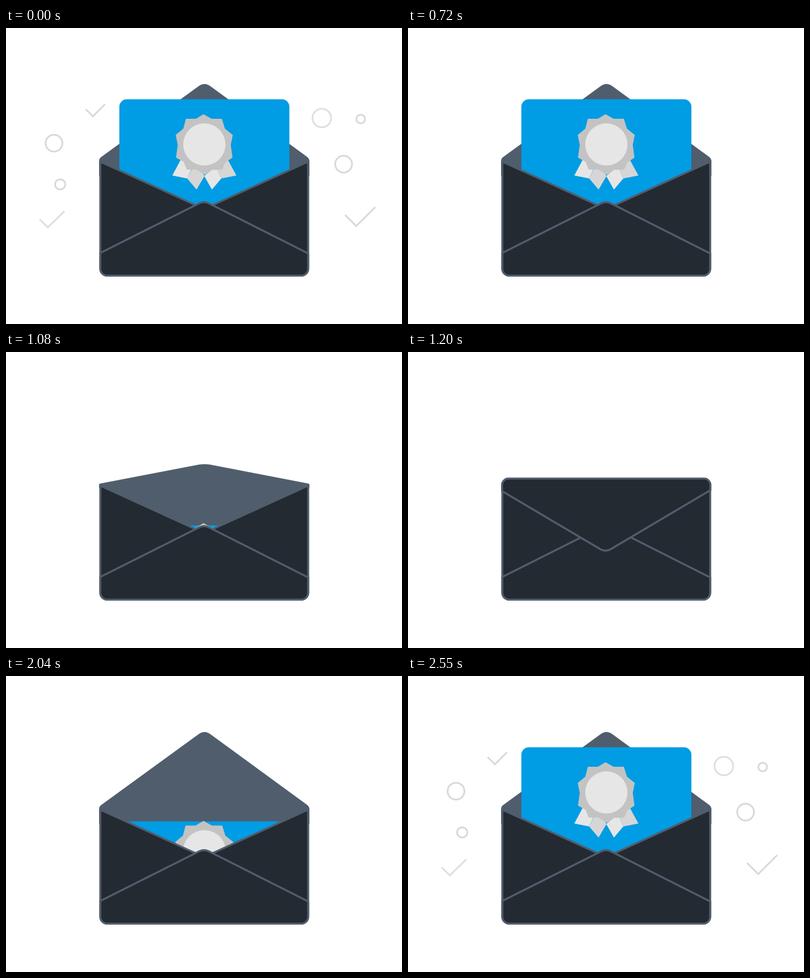
An HTML page without scripts that plays this animation: 800x600 px, repeating every 4500 ms.

```html
<!DOCTYPE html>
<html lang="en">
<head>
<meta charset="utf-8">
<title>Award letter</title>
<style>
  :root {
    --slate: #505d6c;
    --dark: #242a32;
    --in: cubic-bezier(.11, 0, .5, 0);
    --out: cubic-bezier(.5, 1, .89, 1);
    --slow-in: cubic-bezier(.32, 0, .67, 0);
    --slow-out: cubic-bezier(.33, 1, .68, 1);
  }
  html, body { margin: 0; width: 100%; height: 100%; overflow: hidden; background: #fff; }
  svg { display: block; width: 100%; height: 100%; }

  .early, .late, .card, .medal, .pop, .lid, .flap {
    animation: 4500ms linear infinite;
  }

  /* Confetti: --x and --y lead to the hiding place behind the envelope */
  .confetti { fill: none; stroke: #d9d9d9; stroke-width: 3.5; }
  .confetti .pale { stroke: #dfdfdf; }
  .early { animation-name: early; }
  .late { animation-name: late; }
  @keyframes early {
    0%, 8.667% { transform: none; opacity: 1; animation-timing-function: var(--slow-in); }
    18% { transform: translate(var(--x), var(--y)); opacity: 1; animation-timing-function: step-start; }
    18.01%, 45.99% { transform: translate(var(--x), var(--y)); opacity: 0; animation-timing-function: step-end; }
    46% { transform: translate(var(--x), var(--y)); opacity: 1; animation-timing-function: var(--out); }
    53.333%, 100% { transform: none; opacity: 1; }
  }
  @keyframes late {
    0%, 8.667% { transform: none; opacity: 1; animation-timing-function: var(--slow-in); }
    18% { transform: translate(var(--x), var(--y)); opacity: 1; animation-timing-function: step-start; }
    18.01%, 45.99% { transform: translate(var(--x), var(--y)); opacity: 0; animation-timing-function: step-end; }
    46% { transform: translate(var(--x), var(--y)); opacity: 1; animation-timing-function: var(--slow-out); }
    56.667%, 100% { transform: none; opacity: 1; }
  }

  .card { fill: #009ce4; animation-name: card; }
  @keyframes card {
    0%, 17.333% { transform: none; animation-timing-function: var(--in); }
    24.022%, 44% { transform: translateY(207px); animation-timing-function: var(--out); }
    51.111%, 100% { transform: none; }
  }

  .medal { animation-name: medal; }
  @keyframes medal {
    0%, 17.333% { transform: none; animation-timing-function: var(--in); }
    21.733%, 44% { transform: translateY(172px); animation-timing-function: var(--out); }
    50.667%, 100% { transform: none; }
  }
  .pop { transform-origin: 400px 236px; animation-name: pop; }
  @keyframes pop {
    0%, 44% { transform: scale(1); animation-timing-function: ease-out; }
    49.333% { transform: scale(1.045); animation-timing-function: ease-in-out; }
    52.5%, 100% { transform: scale(1); }
  }

  /* The lid is the open flap, the flap is the same piece folded over the front */
  .lid { fill: var(--slate); transform-origin: 400px 268px; animation-name: lid; }
  @keyframes lid {
    0%, 22.222% { transform: scaleY(1); }
    24.667%, 43.333% { transform: scaleY(0); }
    45.333%, 100% { transform: scaleY(1); }
  }
  .flap { transform-origin: 400px 256px; animation-name: flap; }
  @keyframes flap {
    0%, 24.667% { transform: scaleY(0); }
    26.667%, 41.333% { transform: scaleY(1); }
    43.333%, 100% { transform: scaleY(0); }
  }

  .paper { fill: var(--dark); stroke: var(--slate); stroke-width: 4; stroke-linejoin: round; }
  .light { fill: #e6e6e6; }
  .shade { fill: #d6d6d6; }
  .rosette { fill: #c3c3c3; stroke: #c3c3c3; stroke-width: 3; stroke-linejoin: round; }
</style>
</head>
<body>
<svg viewBox="0 0 800 600">
  <clipPath id="inside"><rect width="800" height="490"/></clipPath>

  <g class="confetti">
    <path class="early" style="--x:203px;--y:220px" d="M161 164.5 175.500 179 200 154.500"/>
    <circle class="early" style="--x:287px;--y:150px" cx="97" cy="233.500" r="17"/>
    <circle class="early" style="--x:257px;--y:70px" cx="109.500" cy="317" r="10.300"/>
    <path class="late pale" style="--x:326px;--y:-123px" d="M68 388 84.500 404 118 371.500"/>
    <circle class="late pale" style="--x:-238px;--y:218px" cx="638" cy="182.500" r="18.800"/>
    <circle class="early" style="--x:-450px;--y:260px" cx="716.500" cy="184.500" r="8.800"/>
    <circle class="early" style="--x:-247px;--y:157px" cx="682" cy="276" r="17"/>
    <path class="late" style="--x:-388px;--y:-126px" d="M685 379 707.500 401.500 746 363"/>
  </g>

  <path class="lid" d="M188 300V270Q188 264 193 261L389 118Q401 109 413 118L608 261Q613 265 613 270V300Z"/>
  <path fill="#505d6c" d="M189 268H612V480H189Z"/>

  <g clip-path="url(#inside)">
    <rect class="card" x="229" y="144.500" width="343.500" height="225" rx="15"/>
    <g class="medal"><g class="pop">
      <path class="light" d="M354 265 336 299 366 305 380 275Z"/>
      <path class="shade" d="M376 285 366 305 385 327.500 401 300 390 280Z"/>
      <path class="light" d="M400.500 300 416 327.500 435 305 424 280Z"/>
      <path class="shade" d="M447 265 465.500 299 435 305 422 275Z"/>
      <path class="rosette" d="M399 176.500 415 185.500 435 185.500 441 205 456.500 217.500 452.500 237 456 262 441 272
        436 285.500 416 286 402 296 385 285.500 366 285.500 360 270 345 262 348.500 237 344.500 217.500 359.500 205
        364.500 185.500 384 185.500Z"/>
      <circle class="light" cx="400.700" cy="236" r="42.700"/>
    </g></g>
  </g>

  <g class="paper">
    <path d="M190.500 271 400 367 610.500 271V488a14 14 0 0 1-14 14H204.500a14 14 0 0 1-14-14Z"/>
    <path d="M190.500 456 388 356.500Q400 349.500 412 356.500L610.500 457V488a14 14 0 0 1-14 14H204.500a14 14 0 0 1-14-14Z"/>
    <path class="flap" d="M190 282V269.500a13 13 0 0 1 13-13H598a13 13 0 0 1 13 13V280L409 400Q399 405.500 389 400Z"/>
  </g>
</svg>
</body>
</html>
```
